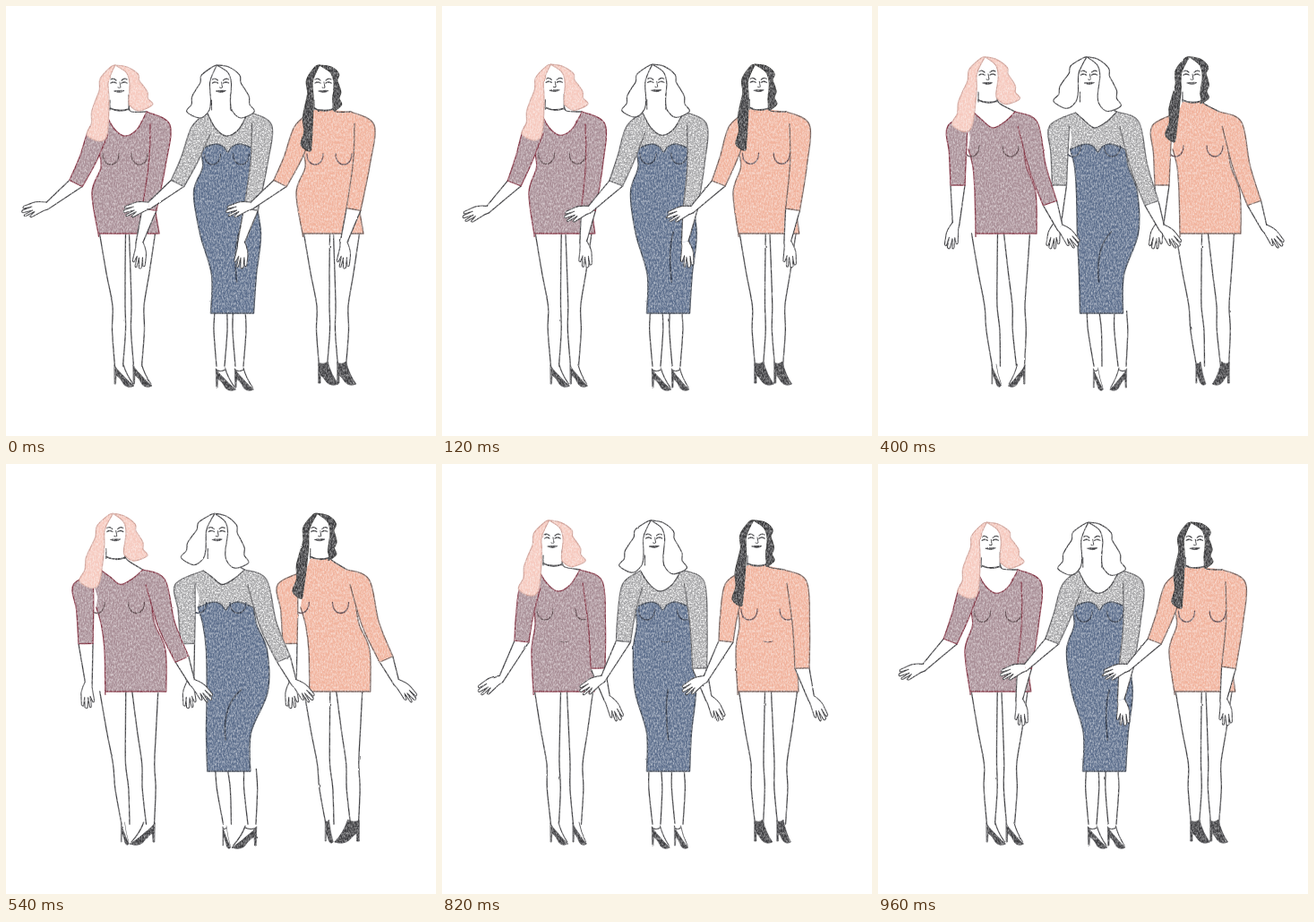
Recreate the animation shown at these times as an HTML page. Size 480 px wide and 480 px high, loop 1.1 s.

```html
<!DOCTYPE html>
<html lang="en">
<head>
<meta charset="utf-8">
<title>Three dancers</title>
<style>
html, body { margin: 0; width: 100%; height: 100%; overflow: hidden; background: #fff; }
svg { display: block; width: 100%; height: 100%; }
path { stroke-linecap: round; stroke-linejoin: round; }
.pose { visibility: hidden; animation: 1100ms step-end infinite; }
</style>
</head>
<body>
<svg id="stage" viewBox="0 0 480 480">
  <defs>
    <filter id="pencil" filterUnits="userSpaceOnUse" x="0" y="0" width="480" height="480" color-interpolation-filters="sRGB">
      <feTurbulence type="fractalNoise" baseFrequency=".09" numOctaves="2" seed="4" result="wave"/>
      <feDisplacementMap in="SourceGraphic" in2="wave" scale="1.6" xChannelSelector="R" yChannelSelector="G" result="ink"/>
      <feTurbulence type="fractalNoise" baseFrequency=".7 .35" numOctaves="3" seed="9"/>
      <feColorMatrix values="0 0 0 0 1  0 0 0 0 1  0 0 0 0 1  0 1.1 0 0 -.38"/>
      <feComposite in2="ink" operator="in" result="grain"/>
      <feMerge><feMergeNode in="ink"/><feMergeNode in="grain"/></feMerge>
    </filter>
    <filter id="lace" color-interpolation-filters="sRGB">
      <feTurbulence type="fractalNoise" baseFrequency=".6" numOctaves="2" seed="2"/>
      <feColorMatrix values="0 0 0 0 1  0 0 0 0 1  0 0 0 0 1  0 3 0 0 -1.4"/>
      <feComposite in2="SourceGraphic" operator="in" result="dots"/>
      <feMerge><feMergeNode in="SourceGraphic"/><feMergeNode in="dots"/></feMerge>
    </filter>
    <clipPath id="below"><rect x="60" y="340" width="160" height="90"/></clipPath>
  </defs>
</svg>
<script>
const INK = '#3d3d40';

// Three key stances; every pose is mixed from them by its lean.
// spine: centre of the body at each of LEVELS. arms: shoulder, elbow, cuff, wrist.
const left = {
  head: [126, 90], spine: [134, 136, 130, 137, 141, 139], bust: [117, 149], fold: [147, 144],
  arms: [[[104, 139], [91, 172], [78, 198], [46, 223]], [[172, 132], [169, 175], [160, 227], [149, 264]]],
  hands: [170, 85],
  legs: [[119, 126, 126], [152, 147, 147]], toes: [1, .95]
};
const middle = {
  head: [123, 87], spine: [133, 134, 134, 136, 140, 139], bust: [115, 158], fold: [139, 139],
  arms: [[[99, 136], [92, 170], [89, 198], [66, 240]], [[168, 132], [173, 182], [174, 228], [184, 261]]],
  hands: [155, 54],
  legs: [[118, 124, 126], [154, 150, 151]], toes: [.9, .7]
};
const right = {
  head: [122, 81], spine: [132, 136, 142, 143, 136, 136], bust: [104, 148], fold: [147, 133],
  arms: [[[89, 134], [89, 165], [89, 200], [87, 243]], [[167, 132], [178, 180], [192, 220], [203, 247]]],
  hands: [110, 42],
  legs: [[119, 126, 132], [155, 157, 159]], toes: [.5, -.85]
};
const LEVELS = [160, 180, 208, 254, 300, 343];
const GIRTH = [31, 30, 34, 34, 25, 24];
const LEANS = [-1, -.75, 0, 1, 1.25];

// Each lock: how far it reaches sideways, how low it drops.
const people = [
  { x: 0, cloth: '#a98f97', edge: '#7f3040', hair: '#f6c9be', hairEdge: '#cfa097', locks: [[35, 61], [37, 27]], choker: true },
  { x: 113.5, cloth: '#a2a2a4', edge: '#5c5c5f', hair: '#fff', hairEdge: INK, locks: [[37, 35], [37, 35]], gown: '#5d6f8d' },
  { x: 228, cloth: '#f1b39d', edge: '#6f5a55', hair: '#3c3c3f', hairEdge: '#333', locks: [[24, 72], [20, 27]], choker: true, boots: true }
];

const lerp = (a, b, t) => a + (b - a) * t;

function mix(a, b, t) {
  if (typeof a === 'number') return lerp(a, b, t);
  if (Array.isArray(a)) return a.map((v, i) => mix(v, b[i], t));
  return Object.fromEntries(Object.keys(a).map(k => [k, mix(a[k], b[k], t)]));
}

// Smooth runs of points, with a sharp corner between runs.
function curve(...parts) {
  let d = '', last;
  for (const part of parts) {
    const run = last ? [last, ...part] : part;
    if (!last) d = 'M' + run[0];
    for (let i = 0; i < run.length - 1; i++) {
      const b = run[i], c = run[i + 1], a = run[i - 1] || b, e = run[i + 2] || c;
      const h1 = b.map((v, k) => v + (c[k] - a[k]) / 6);
      const h2 = c.map((v, k) => v - (e[k] - b[k]) / 6);
      d += `C${h1} ${h2} ${c}`;
    }
    last = run[run.length - 1];
  }
  return d;
}

const path = (d, fill = 'none', stroke = INK, width = 1.3, extra = '') =>
  `<path d="${d}" fill="${fill}" stroke="${stroke}" stroke-width="${width}" ${extra}/>`;
const line = (d, stroke, width) => path(d, 'none', stroke, width);
const group = (transform, body) => `<g transform="${transform}">${body}</g>`;

// One edge of a limb: its joints pushed out sideways by the half-widths.
const edge = (joints, widths, side) => joints.map(([x, y], i) => {
  const a = joints[i - 1] || joints[i], b = joints[i + 1] || joints[i];
  const dx = b[0] - a[0], dy = b[1] - a[1], k = side * widths[i] / Math.hypot(dx, dy);
  return [x + dy * k, y - dx * k];
});

const flank = (pose, side, count) =>
  pose.spine.slice(0, count).map((x, i) => [x + side * GIRTH[i], LEVELS[i]]);

const HAND = 'M0-4C6-6 12-7 16-6L26-4Q28-2 26-1.5L17-2L28 0Q30 2 28 3L17 2L27 5.5Q28 7.5 25 7L15 4L21 8Q21 10 18 9L9 6Q4 4 0 4';
const PUMP = 'M0 0C3 6 8 9 13 15Q18 20 22 23Q16 26 11 22Q7 14 2 11L1.5 21H.5Z';
const BOOT = 'M0-2Q5 1 10-3Q14 12 22 22Q14 25 9 20Q5 14 2 12L2 21H0Z';

function arm(pose, p, i, shoulder, weave) {
  const side = i ? 1 : -1;
  const joints = pose.arms[i], wrist = joints[3], turn = pose.hands[i];
  const t = turn * Math.PI / 180;
  const wristAt = s => [wrist[0] + Math.sin(t) * 4 * s, wrist[1] - Math.cos(t) * 4 * s];
  const widths = [11, 9.5, 8];
  const outer = edge(joints.slice(0, 3), widths, side);
  const inner = edge(joints.slice(0, 3), widths, -side).reverse();
  const bare = [[outer[2], wristAt(side)], [wristAt(-side), inner[0]]];
  const pit = [pose.spine[0] + side * (GIRTH[0] - 5), LEVELS[0]];
  const sleeve = [[shoulder, ...outer], [inner[0]], inner.slice(1)];
  return path(curve(bare[0], [bare[1][0]], [bare[1][1]]), '#fff', 'none')
    + group(`translate(${wrist}) rotate(${turn}) scale(1 ${side})`, path(HAND, '#fff', INK, 1.1))
    + bare.map(b => line(curve(b))).join('')
    + path(curve(...sleeve, [pit]), p.cloth, 'none', 0, weave)
    + line(curve(...sleeve), p.edge);
}

function leg([hip, knee, ankle]) {
  const rows = [[hip, 254, 14.5], [lerp(hip, knee, .5), 298, 10.5], [knee, 335, 7], [lerp(knee, ankle, .4), 362, 7.5], [ankle, 402, 4.5]];
  return [-1, 1].map(s => line(curve(rows.map(([x, y, w]) => [x + s * w, y])))).join('');
}

function shoe(ankle, toe, p) {
  const y = p.gown ? 405 : p.boots ? 400 : 401;
  const strap = p.gown ? path('M0 1Q5 4 10 1', 'none', INK, 1.1) : '';
  const foot = p.boots ? '' : path('M10-1Q13 10 21 21', 'none', INK, 1.1);
  return group(`translate(${ankle - 5 * Math.sign(toe)} ${y}) scale(${toe} 1)`,
    path(p.boots ? BOOT : PUMP, INK, INK, .7) + foot + strap);
}

// A lock falls from the parting, swings outwards in waves and returns along the face.
function lock([reach, drop], side) {
  const outer = [[-4 * side, -24], [9, -22]];
  for (let t = .15; t < 1.01; t += .17) {
    outer.push([15 + (reach - 15) * t ** .8 + Math.sin(t * 13) * 1.6, lerp(-20, drop - 7, t)]);
  }
  const tip = [[reach * .62, drop], [13, Math.max(drop - 8, 22)]];
  const inner = [[11, 16], [12, -4], [8, -16], [-4 * side, -24]];
  const flip = pts => pts.map(([x, y]) => [x * side, y]);
  return curve(flip([...outer, ...tip, ...inner]));
}

function head([x, y], lean, p) {
  const face = path('M-11-17C-13-3-12 8-10 15V25H11V15C13 4 13-8 10-17Q0-24-11-17', '#fff', 'none')
    + path('M-9-8Q-6-10-3-7M3-7Q6-10 9-8', 'none', INK, 1.2)
    + path('M-9-4Q-6-6-3-4M3-4Q6-6 9-4', 'none', INK, 1.5)
    + path('M1-5L2 1Q1 2-1 1', 'none', INK, 1)
    + path('M-5 5Q-2 4 0 4.5Q2 4 6 4.5Q1 8-5 5', INK, INK, .8)
    + path('M-10 15V26M11 9V26', 'none', INK, 1.1);
  const choker = p.choker ? path('M-10 24Q0 29 11 25', 'none', INK, 1.8) : '';
  const hair = p.locks.map((l, i) => path(lock(l, i ? 1 : -1), p.hair, p.hairEdge, 1.2)).join('');
  return group(`translate(${x} ${y})`, face + choker + group(`rotate(${2 + 2 * lean})`, hair));
}

function person(pose, lean, p) {
  const [x, y] = pose.head;
  const weave = p.gown ? 'filter="url(#lace)"' : '';
  const shoulders = [[x - 15, 119], [x + 31, 118]];
  const scoop = [shoulders[0], [x - 6, y + 46], [x + 6, y + 55], [x + 20, y + 48], shoulders[1]];
  const collar = [[x + 11, y + 26], [x - 10, y + 26]];
  const sides = n => [flank(pose, 1, n), flank(pose, -1, n).reverse()];
  const legs = pose.legs.map(leg).join('');
  const cup = c => `M${c - 9} ${y + 75}C${c - 9} ${y + 91} ${c + 9} ${y + 91} ${c + 9} ${y + 75}`;
  const seam = p.gown ? '#30394a' : '#5f494e';

  let out = p.gown ? `<g clip-path="url(#below)">${legs}</g>` : legs;
  out += pose.legs.map((l, i) => shoe(l[2], pose.toes[i], p)).join('');
  out += path(curve(scoop, [collar[0]], [collar[1]]), p.boots ? p.cloth : '#fff', 'none');
  out += line(curve([shoulders[1], [x + 14, y + 28], [x + 11, y + 22]]));
  const [down, up] = sides(4);
  out += path(curve(scoop, [down[0]], down, [up[0]], up), p.cloth, 'none', 0, weave);
  if (p.gown) {
    const [r, l] = sides(6), c = pose.spine[0];
    const heart = [[c - 14, 154], [c - 5, 157], [c, 163], [c + 5, 157], [c + 14, 154], r[0]];
    const [a, b] = pose.fold;
    out += path(curve([l[5], ...heart], r, [l[0]], l.slice(1)), p.gown, '#3b4350', 1.4);
    out += line(`M${a} 252Q${b - 4} 270 ${b} 308`, seam, 1.7);
  } else {
    out += line(curve(down, [up[0]], up), p.edge);
  }
  if (!p.boots) out += line(curve(scoop), p.gown ? INK : p.edge);
  out += pose.bust.map(c => line(cup(c), seam)).join('');
  if (!lean) out += line('M131 198Q136 200 141 198', seam, 1);
  out += shoulders.map((s, i) => arm(pose, p, i, s, weave)).join('');
  return group(`translate(${p.x} 0)`, out + head(pose.head, lean, p));
}

// Leaning right, each outstretched arm passes in front of the neighbour.
const scene = LEANS.map((lean, i) => {
  const pose = mix(middle, lean < 0 ? left : right, Math.abs(lean));
  const row = people.map(p => person(pose, lean, p));
  if (lean > 0) row.reverse();
  return `<g class="pose" style="animation-name:pose${i}" filter="url(#pencil)">${row.join('')}</g>`;
}).join('');
document.getElementById('stage').insertAdjacentHTML('beforeend', scene);

// Eight steps sway to the right and back; the first is 20 ms shorter.
const swing = Array.from({ length: 8 }, (_, k) => 4 - Math.abs(4 - k));
const rules = LEANS.map((_, i) => {
  const stops = swing.map((s, k) =>
    `${Math.max(0, 140 * k - 20) / 11}% { visibility: ${s === i ? 'visible' : 'hidden'} }`);
  return `@keyframes pose${i} { ${stops.join(' ')} }`;
});
document.head.appendChild(document.createElement('style')).textContent = rules.join('\n');
</script>
</body>
</html>
```
